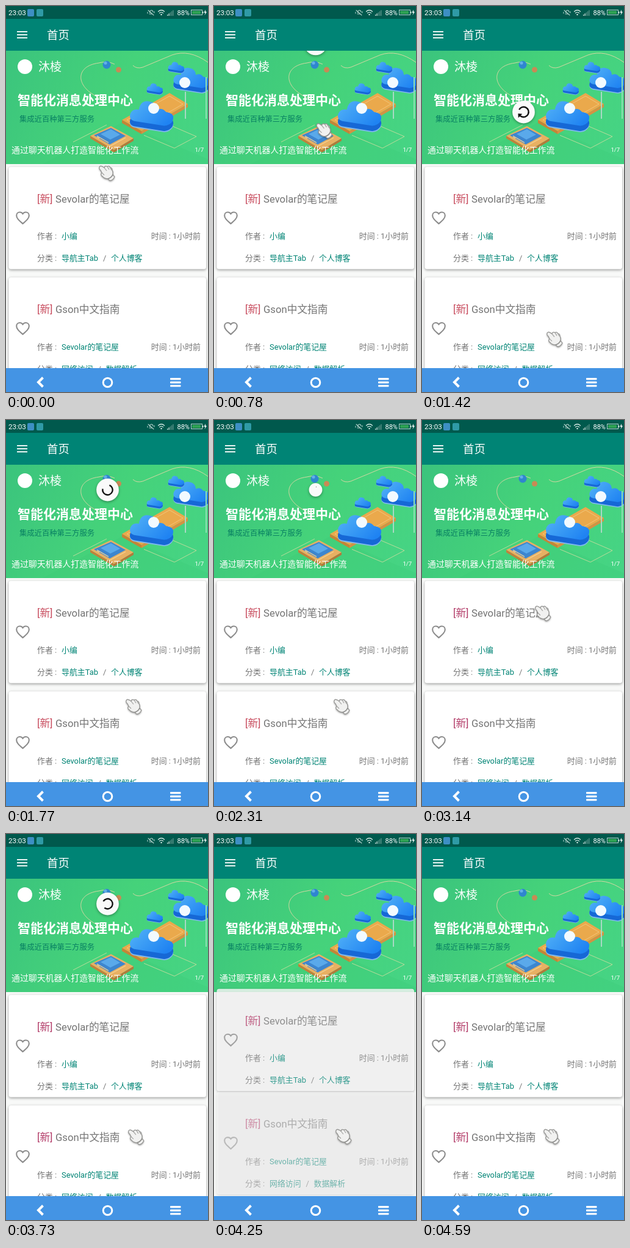
An HTML page with a canvas that plays this animation: 331x630 px, repeating every 5.2 s.

```html
<!DOCTYPE html>
<html lang="zh-CN">
<head>
<meta charset="utf-8">
<title>首页</title>
<style>
html, body { margin: 0; width: 100%; height: 100%; overflow: hidden; background: #f8f8f8; }
canvas { display: block; width: 331px; height: 630px; }
</style>
</head>
<body>
<canvas id="stage"></canvas>
<script>
const W = 331, H = 630, LOOP = 5200, TAU = Math.PI * 2;
const FONT = 'Roboto, "Noto Sans CJK SC", "Noto Sans CJK", sans-serif';
const TEAL = '#008475', GREY = '#747474';
const canvas = document.getElementById('stage');
const c = canvas.getContext('2d');
const dpr = window.devicePixelRatio || 1;
canvas.width = W * dpr;
canvas.height = H * dpr;

const clamp = (v, a = 0, b = 1) => Math.min(b, Math.max(a, v));
const mix = (a, b, p) => a + (b - a) * p;
const smooth = p => p * p * (3 - 2 * p);
const decel = p => 1 - (1 - p) * (1 - p);
const phase = (t, start, dur) => clamp((t - start) / dur);

// Pointer path: time, x, y
const path = [
  [0, 165, 273], [200, 165, 273], [490, 179, 190], [715, 179, 190],
  [1270, 217, 545], [1450, 217, 544], [1760, 209, 468], [2890, 209, 468],
  [3220, 196, 290], [3230, 196, 290], [3410, 214, 516], [3470, 214, 515],
  [3710, 213, 495], [3800, 212, 494], [LOOP, 212, 494]
];
// Pull gestures: press, release, end of refresh, list reload
const pulls = [
  { press: 715, y0: 190, release: 1450, done: 2250, reload: 2440 },
  { press: 3230, y0: 290, release: 3460, done: 3870, reload: 4060 }
];

function pointer(t) {
  const i = path.findIndex((k, n) => n && t <= k[0]);
  const a = path[i - 1], b = path[i];
  const p = smooth((t - a[0]) / (b[0] - a[0]));
  return { x: mix(a[1], b[1], p), y: mix(a[2], b[2], p) };
}

function text(str, x, y, size, color, weight = 400, align = 'left') {
  c.font = `${weight} ${size}px ${FONT}`;
  c.textAlign = align;
  c.fillStyle = color;
  c.fillText(str, x, y);
}
function rect(x, y, w, h, color) {
  c.fillStyle = color;
  c.fillRect(x, y, w, h);
}
function box(x, y, w, h, r, color) {
  c.beginPath();
  c.roundRect(x, y, w, h, r);
  c.fillStyle = color;
  c.fill();
}
function disc(x, y, r, color) {
  c.beginPath();
  c.arc(x, y, r, 0, TAU);
  c.fillStyle = color;
  c.fill();
}
function poly(points, color) {
  c.beginPath();
  points.forEach(p => c.lineTo(...p));
  c.closePath();
  c.fillStyle = color;
  c.fill();
}
function stroke(d, color, width) {
  c.strokeStyle = color;
  c.lineWidth = width;
  c.stroke(new Path2D(d));
}
function shadow(color, blur, dy) {
  c.shadowColor = color;
  c.shadowBlur = blur * dpr;
  c.shadowOffsetY = dy * dpr;
}
function noShadow() { c.shadowColor = 'transparent'; }

function bars() {
  rect(0, 0, W, 21, '#00594d');
  rect(0, 21, W, 52, TEAL);
  text('23:03', 4, 15, 11.6, '#fff');
  box(35, 5, 11, 12, 2, '#3d8fc4');
  box(50, 5, 11, 12, 2, '#2f9aa6');
  c.lineCap = 'round';
  stroke('M233 7l9 8M235 13h5M235.500 11q0 -4 3 -4q2 0 2.500 3M232 10v2M243 9v2', '#b4d2cc', 1.1);
  stroke('M249.500 9q5 -4.500 10 0M251.500 11.500q3 -2.500 6 0', '#d5e8e4', 1.2);
  disc(254.5, 14, 1.2, '#d5e8e4');
  for (let i = 0; i < 5; i++) rect(264 + i * 2.3, 14 - i * 1.8, 1.3, 2 + i * 1.8, i < 2 ? '#c2dad5' : '#5d938a');
  text('88%', 280.5, 15, 11, '#fff');
  c.lineWidth = 1;
  c.strokeStyle = '#b5d6c8';
  c.strokeRect(303.5, 6.500, 18, 8);
  rect(305, 8, 14, 5, '#2fa354');
  rect(322, 9, 1.500, 3, '#b5d6c8');
  poly([[327, 6], [324.5, 11], [326.5, 11], [325.500, 15], [329, 9.500], [327, 9.500]], '#fff');
  for (let i = 0; i < 3; i++) rect(18, 41 + i * 5, 17, 1.8, '#fff');
  text('首页', 67, 54, 18.4, '#fff');
}

function cloud(x, y, s) {
  c.save();
  c.translate(x, y);
  c.scale(s, s);
  const shape = new Path2D('M-30 12q-10 -3 -6 -13q4 -8 14 -6q3 -17 18 -14q12 2 13 14q9 -4 15 4q16 2 11 15q-4 7 -14 8z');
  for (const [dy, color] of [[11, '#7fb9ee'], [9, '#1668d6']]) {
    c.translate(0, dy);
    c.fillStyle = color;
    c.fill(shape);
    c.translate(0, -dy);
  }
  const g = c.createLinearGradient(-20, -20, 20, 22);
  g.addColorStop(0, '#4aaaf6');
  g.addColorStop(1, '#1f83f2');
  c.fillStyle = g;
  c.fill(shape);
  c.restore();
}

function banner() {
  c.save();
  c.beginPath();
  c.rect(0, 73, W, 185);
  c.clip();
  const g = c.createLinearGradient(0, 73, W, 258);
  g.addColorStop(0, '#3bc47d');
  g.addColorStop(0.5, '#45d27a');
  g.addColorStop(1, '#46d485');
  rect(0, 73, W, 185, g);
  poly([[60, 258], [190, 190], [331, 250], [331, 258]], '#38c57544');
  stroke('M158 152C112 134 112 98 152 93Q166 89 178 95M208 97Q214 103 224 100L272 80Q300 70 331 92', '#d3d7a2', 1);
  stroke('M110 222L165 194M226 211L276 232L312 213L270 195', '#b9dc9a', 1);

  // Platform
  poly([[190, 186], [268, 142], [298, 160], [222, 204]], '#eaa94c');
  poly([[190, 186], [222, 204], [222, 209], [190, 191]], '#c58437');
  poly([[222, 204], [298, 160], [298, 165], [222, 209]], '#d39243');
  stroke('M198 186L268 147L290 160L222 199Z', '#f3c67a', 1);
  stroke('M294 140V184', '#a9d9c4', 2);

  cloud(244, 134, 0.36);
  cloud(239, 176, 0.97);
  cloud(304, 118, 0.8);
  cloud(279, 99, 0.36);
  disc(242, 167, 9, '#f2faff');
  disc(293, 125, 9, '#f2faff');
  rect(327, 116, 2, 68, '#8fe3b4');

  // Laptop
  poly([[138, 212], [172, 196], [209, 216], [177, 235]], '#e8b063');
  poly([[138, 212], [177, 235], [177, 239], [138, 216]], '#c1813b');
  poly([[177, 235], [209, 216], [209, 220], [177, 239]], '#b3793a');
  poly([[144, 211], [172, 199], [196, 212], [170, 226]], '#3d86cf');
  poly([[155, 209], [172, 201], [187, 210], [171, 218]], '#5aa9ea');
  stroke('M149 212l19 11M153 216l-4 -2M170 229l26 -14', '#f5d492', 1.3);

  disc(165, 96, 6.5, '#2f86cf');
  disc(163, 93, 2.6, '#62b0e8');
  disc(184.500, 104, 4.500, '#c88a55');

  disc(31, 99, 12, '#fff');
  text('沐棱', 53, 106, 19, '#fff', 500);
  text('智能化消息处理中心', 19, 160.5, 21, '#fff', 700);
  text('集成近百种第三方服务', 22, 188.500, 12.3, '#087f62');
  text('通过聊天机器人打造智能化工作流', 9, 240, 13.9, '#fff');
  text('1/7', 309.500, 238, 9.5, '#fff');
  c.restore();
}

const cards = [
  { y: 262, title: 'Sevolar的笔记屋', by: '小编', tags: ['导航主Tab', '个人博客'] },
  { y: 442.5, title: 'Gson中文指南', by: 'Sevolar的笔记屋', tags: ['网络访问', '数据解析'] }
];

function card(d, p, tagColor) {
  if (p <= 0) return;
  c.save();
  c.globalAlpha = p;
  c.translate(0, d.y - 47 * (1 - p));
  shadow(`rgba(0,0,0,${mix(0.1, 0.38, p)})`, 4, 1.5);
  box(4.5, 0.500, 323.500, 167, 4, '#fff');
  noShadow();
  text('[新]', 51, 58.5, 16.7, tagColor);
  text(d.title, 81, 58.5, 16.7, GREY);
  stroke('M27.500 93.300C21 87.500 17.200 84.300 17.200 79.900C17.200 76.700 19.700 74.500 22.600 74.500C24.600 74.500 26.400 75.500 27.500 77.100C28.600 75.500 30.400 74.500 32.400 74.500C35.300 74.500 37.800 76.700 37.800 79.900C37.800 84.300 34 87.500 27.500 93.300Z', '#8c8c8c', 2.1);
  text('作者 :', 51, 118, 12.9, GREY);
  text(d.by, 91, 118, 12.9, TEAL);
  text('时间 : 1小时前', 319, 118, 12.9, GREY, 400, 'right');
  text('分类 :', 51, 154, 12.9, GREY);
  let x = 91;
  d.tags.forEach((tag, i) => {
    if (i) {
      text('/', x + 8, 154, 12.9, GREY);
      x += 21;
    }
    text(tag, x, 154, 12.9, TEAL);
    x += c.measureText(tag).width;
  });
  c.restore();
}

function list(t) {
  const last = pulls.filter(p => t >= p.reload).pop();
  const color = last ? '#b23a67' : '#c74a5c';
  cards.forEach((d, i) => card(d, last ? decel(phase(t, last.reload + i * 80, 350)) : 1, color));
}

function drag(pull, y) {
  const reach = 59, d = Math.max(0, (y - pull.y0) * 0.5);
  const part = clamp(d / reach);
  const k = clamp(d - reach, 0, reach * 2) / reach / 4;
  const tension = (k - k * k) * 2;
  const adj = Math.max(part - 0.4, 0) * 5 / 3;
  return {
    move: reach * (part + tension * 2),
    turn: (-0.25 + 0.4 * adj + tension * 2) * 0.5,
    sweep: Math.min(0.8, adj * 0.8),
    head: Math.min(1, adj),
    alpha: d > reach ? 1 : 0.3
  };
}

function spinner(t) {
  const pull = pulls.find(p => t >= p.press && t < p.done + 150);
  if (!pull) return;
  const s = drag(pull, pointer(Math.min(t, pull.release)).y);
  let start = s.turn, end = s.turn + s.sweep;
  if (t > pull.release) {
    s.move = mix(s.move, 59, decel(phase(t, pull.release, 200)));
    const rot = (t - pull.release) / 1332 * 0.65;
    start = mix(start, end - 0.03, smooth(phase(t, pull.release + 200, 620))) + rot;
    end += rot;
    s.head = 1 - phase(t, pull.release, 200);
  }
  if (s.move < 0.5) return;
  const scale = 1 - phase(t, pull.done, 150);
  c.save();
  c.beginPath();
  c.rect(0, 73, W, 518);
  c.clip();
  c.translate(166.5, 55 + s.move);
  c.scale(scale, scale);
  shadow('rgba(0,0,0,.35)', 4, 1.5);
  disc(0, 0, 18.4, '#fafafa');
  noShadow();
  c.globalAlpha = s.alpha * scale;
  c.strokeStyle = '#111';
  c.lineWidth = 2.4;
  c.lineCap = 'butt';
  c.beginPath();
  c.arc(0, 0, 8.2, start * TAU, end * TAU);
  c.stroke();
  if (s.head > 0) {
    c.rotate(end * TAU);
    c.translate(8.2, 0);
    c.scale(s.head, s.head);
    poly([[-4.6, -0.5], [4.6, -0.5], [0, 4.600]], '#111');
  }
  c.restore();
}

function navbar() {
  rect(0, 591, W, 39, '#4494e4');
  c.lineCap = 'butt';
  stroke('M60.500 606.500L53 614L60.500 621.500', '#fff', 4);
  c.beginPath();
  c.arc(166.500, 614.500, 7.300, 0, TAU);
  c.lineWidth = 3;
  c.stroke();
  for (let i = 0; i < 3; i++) box(269, 607 + i * 5.7, 17.500, 3.2, 1, '#fff');
}

const handShape = new Path2D('M-12 -10Q-11 -13 -7 -11L-4 -9Q-3 -13 1 -11Q4 -13 6 -9Q9 -9 9 -5Q11 -2 10 2L13 6Q10 12 5 12L2 9Q-4 9 -7 5Q-11 3 -8 -1L-10 -5Q-13 -7 -12 -10Z');
function hand(t) {
  const { x, y } = pointer(t);
  c.save();
  c.translate(x, y);
  c.lineJoin = 'round';
  shadow('rgba(0,0,0,.45)', 3, 1.500);
  c.fillStyle = '#f1f1f0';
  c.fill(handShape);
  noShadow();
  c.strokeStyle = '#9a9a98';
  c.lineWidth = 1.4;
  c.stroke(handShape);
  stroke('M-4 -9L0 -4M1 -11L4 -6M6 -9L8 -5M-8 -1L-4 3', '#a2a2a0', 1.2);
  stroke('M10 2Q8 7 2 9', '#8a8a88', 1.6);
  c.restore();
}

function draw(t) {
  c.setTransform(dpr, 0, 0, dpr, 0, 0);
  rect(0, 0, W, H, '#f8f9f8');
  banner();
  list(t);
  spinner(t);
  bars();
  navbar();
  hand(t);
}

const begin = performance.now();
function tick() {
  draw((performance.now() - begin) % LOOP);
  requestAnimationFrame(tick);
}
tick();
</script>
</body>
</html>
```
